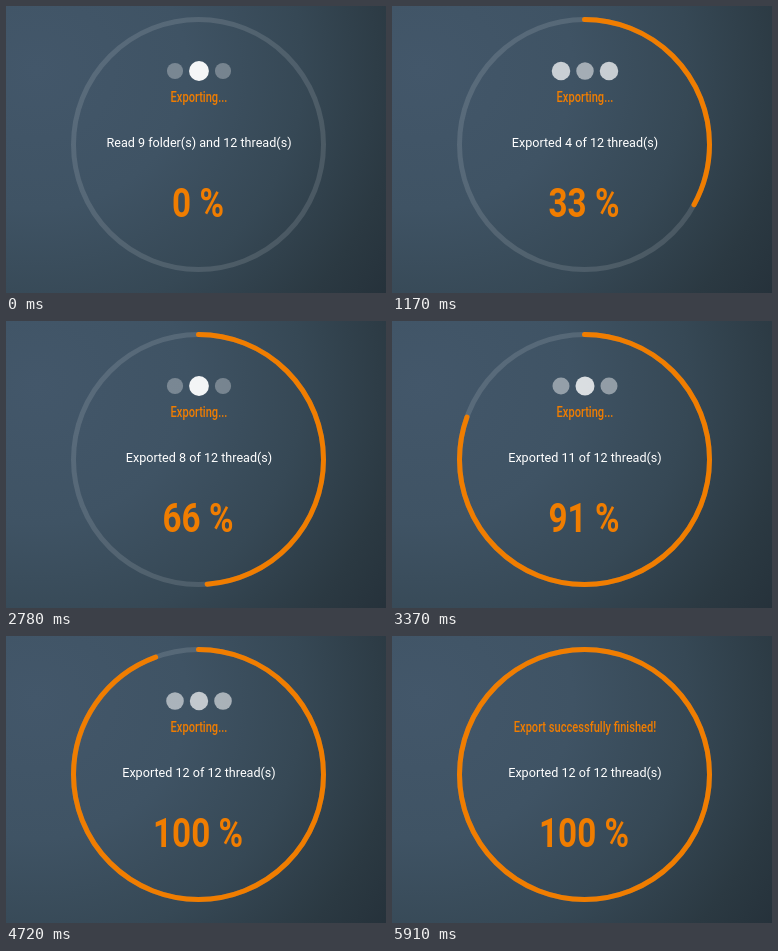
These frames come from a looping animation (380x287 px, 9500 ms). An HTML page:

```html
<!DOCTYPE html>
<html lang="en">
<head>
<meta charset="utf-8">
<title>Export progress</title>
<style>
  html, body { margin: 0; width: 100%; height: 100%; overflow: hidden; }
  body { background: radial-gradient(ellipse 430px 400px at 8% 22%, #43576a, #3f5364 35%, #364855 62%, #2b3942 85%, #25313a); }
  svg { display: block; width: 380px; height: 287px; }
  text { text-anchor: middle; font-family: Roboto, sans-serif; }
  .ring { fill: none; stroke-width: 5; }
  .accent { fill: #f07d00; }
  .label { font-size: 15px; font-weight: 500; }
  #percent { font-size: 41px; font-weight: 700; }
  #status { font-size: 12.6px; fill: #fff; }
</style>
</head>
<body>
<svg viewBox="0 0 380 287">
  <circle class="ring" cx="192.5" cy="138.5" r="125" stroke="#fff" stroke-opacity=".12"/>
  <circle id="arc" class="ring" cx="192.5" cy="138.5" r="125" stroke="#f07d00" stroke-linecap="round"
    pathLength="100" transform="rotate(-90 192.5 138.5)"/>
  <g id="dots" fill="#fff">
    <circle cx="169" cy="65"/><circle cx="193" cy="65"/><circle cx="217" cy="65"/>
  </g>
  <text id="label" class="accent label" y="5.5" transform="translate(193 90.5) scale(.74 1)"></text>
  <text id="burst" class="accent label" y="5.5">Export successfully finished!</text>
  <text id="status" x="193" y="141"></text>
  <text id="percent" class="accent" transform="translate(192 211) scale(.81 1)"></text>
</svg>
<script>
const LOOP = 9500, FINISH = 4800, BURST = 900, PULSE = 690;
const $ = id => document.getElementById(id);
const [arc, dots, label, burst, status_, percent] =
  ['arc', 'dots', 'label', 'burst', 'status', 'percent'].map($);

// start time, threads exported, percent reached
const stages = [[450, 4, 33], [2500, 8, 66], [3050, 11, 91], [4450, 12, 100]];

const clamp = x => Math.min(1, Math.max(0, x));
const ease = x => (1 - Math.cos(Math.PI * clamp(x))) / 2;

function drawProgress(t) {
  let ring = 0, shown = 0, message = 'Read 9 folder(s) and 12 thread(s)';
  for (const [start, count, value] of stages) {
    if (t < start) break;
    ring += (value - shown) * ease((t - start) / 600);
    shown = value;
    message = `Exported ${count} of 12 thread(s)`;
  }
  arc.style.visibility = ring > 0 ? 'visible' : 'hidden';
  arc.setAttribute('stroke-dasharray', ring > 99.9 ? 'none' : `${ring} 200`);
  status_.textContent = message;
  percent.textContent = `${shown} %`;
}

function drawDots(t) {
  const phase = ((t - 15) / PULSE + 1) % 1;
  const middle = Math.abs(1 - 2 * phase);
  [...dots.children].forEach((dot, i) => {
    const level = i === 1 ? middle : 1 - middle;
    dot.setAttribute('r', 8 + 2 * level);
    dot.setAttribute('opacity', .27 + .71 * level);
  });
}

function drawLabel(t) {
  const done = t >= FINISH, p = clamp((t - FINISH) / BURST), size = 1 + 3.45 * p;
  dots.style.display = done ? 'none' : '';
  label.textContent = done ? 'Export successfully finished!' : 'Exporting...';
  burst.setAttribute('transform', `translate(193 90.5) scale(${.74 * size} ${size})`);
  burst.setAttribute('opacity', done ? (1 - p) ** 1.8 : 0);
}

function frame() {
  // the motion advances in coarse ticks
  const t = Math.floor(performance.now() % LOOP / 146.2) * 147;
  drawProgress(t);
  drawDots(t);
  drawLabel(t);
  requestAnimationFrame(frame);
}
frame();
</script>
</body>
</html>
```
